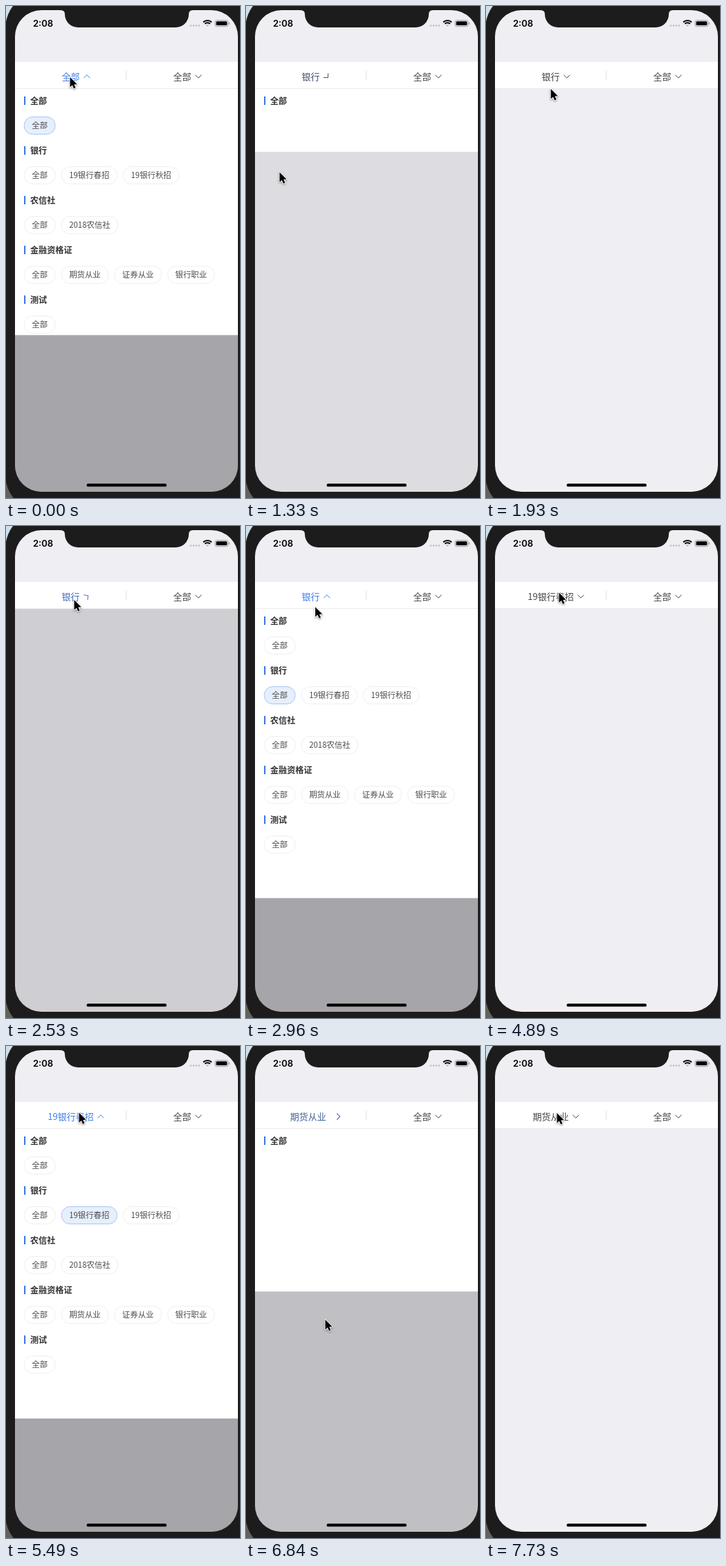
An HTML page with a canvas that plays this animation: 338 by 712 pixels, repeating every 8000 ms.

```html
<!DOCTYPE html>
<html lang="zh-CN">
<head>
<meta charset="utf-8">
<title>Filter dropdown</title>
<style>
html, body { margin: 0; width: 100%; height: 100%; overflow: hidden; background: #1c1c1c; }
canvas { display: block; width: 338px; height: 712px; }
</style>
</head>
<body>
<canvas id="stage"></canvas>
<script>
const W = 338, H = 712, LOOP = 8000;
const CJK = '"Noto Sans CJK SC", "Noto Sans CJK", "Noto Sans SC", sans-serif';
const BAR_END = 119.5, PANEL_H = 361;
const BLUE = [62, 125, 230], DARK = [68, 68, 68];

const canvas = document.getElementById('stage');
const ctx = canvas.getContext('2d');
const dpr = window.devicePixelRatio || 1;
canvas.width = W * dpr;
canvas.height = H * dpr;

const sections = [
  ['全部', '全部'],
  ['银行', '全部', '19银行春招', '19银行秋招'],
  ['农信社', '全部', '2018农信社'],
  ['金融资格证', '全部', '期货从业', '证券从业', '银行职业'],
  ['测试', '全部']
];

// Each visit to the menu: opening time, closing time, title before and after, selected [section, chip]
const visits = [
  { open: -800, close: 1169, from: '全部', to: '银行', pick: [0, 1] },
  { open: 2380, close: 3584, from: '银行', to: '19银行春招', pick: [1, 1] },
  { open: 5040, close: 6736, from: '19银行春招', to: '期货从业', pick: [1, 2] }
];

const bursts = [
  [0, 0, 1], [150, 1040, 7], [1330, 2080, 6], [2530, 3400, 7], [3690, 3840, 2], [4140, 4290, 2],
  [4740, 4890, 2], [5190, 6090, 7], [6240, 7140, 7], [7290, 7290, 1], [7580, 7730, 2]
];
const ticks = bursts.flatMap(([a, b, n]) =>
  Array.from({ length: n }, (_, i) => n > 1 ? a + Math.round((b - a) * i / (n - 1) / 10) * 10 : a));

const pointerPath = [
  [0, 92.5, 103], [890, 48.5, 240.5], [1400, 48.5, 240.5], [2080, 98.5, 107],
  [2680, 98.5, 107], [3400, 119.5, 241], [3990, 119.5, 241], [4290, 106.5, 89.5],
  [4590, 106.5, 89.5], [4890, 105.5, 96.5], [5490, 105.5, 96.5], [6540, 114.5, 396],
  [6840, 114.5, 396], [7140, 99, 188], [7290, 101.5, 94.5], [7440, 101.5, 94.5],
  [7730, 102.5, 97], [LOOP, 102.5, 97]
];

const clamp = v => Math.max(0, Math.min(1, v));
const mix = (a, b, k) => a + (b - a) * k;
const ease = k => k < 0.5 ? 2 * k * k : 1 - 2 * (1 - k) ** 2;
const mixColor = (a, b, k) => `rgb(${a.map((v, i) => Math.round(mix(v, b[i], k)))})`;

function spring(sec) {
  if (sec <= 0) return 0;
  const decay = 7.26, freq = 4 * Math.PI;
  return 1 - Math.exp(-decay * sec) * (Math.cos(freq * sec) + decay / freq * Math.sin(freq * sec));
}

function pointerAt(t) {
  const i = pointerPath.findIndex(p => p[0] > t);
  const [t0, x0, y0] = pointerPath[i - 1], [t1, x1, y1] = pointerPath[i];
  const k = ease((t - t0) / (t1 - t0));
  return [mix(x0, x1, k), mix(y0, y1, k)];
}

function rect(x, y, w, h, color) {
  ctx.fillStyle = color;
  ctx.fillRect(x, y, w, h);
}

function round(x, y, w, h, r, fill, stroke) {
  ctx.beginPath();
  ctx.roundRect(x, y, w, h, r);
  if (fill) { ctx.fillStyle = fill; ctx.fill(); }
  if (stroke) { ctx.strokeStyle = stroke; ctx.stroke(); }
}

function text(str, x, midY, size, color, weight = 400) {
  ctx.font = `${weight} ${size}px ${CJK}`;
  ctx.fillStyle = color;
  ctx.fillText(str, x, midY + size * 0.38);
}

function titleLayout(str, center) {
  ctx.font = `400 13px ${CJK}`;
  const w = ctx.measureText(str).width;
  const x = center - (w + 15) / 2;
  return { x, arrow: x + w + 10.3 };
}

function chevron(x, turn, color) {
  ctx.save();
  ctx.translate(x, 102);
  ctx.rotate(turn * Math.PI);
  ctx.beginPath();
  ctx.moveTo(-4.5, 2.2);
  ctx.lineTo(0, -2.2);
  ctx.lineTo(4.5, 2.2);
  ctx.strokeStyle = color;
  ctx.stroke();
  ctx.restore();
}

function drawStatusBar() {
  ctx.fillStyle = '#000';
  ctx.font = '600 13px Inter, sans-serif';
  ctx.fillText('2:08', 39, 29.8);
  for (let i = 0; i < 4; i++) round(265.4 + i * 4, 27, 2.8, 2.8, 1.4, '#c3c3c8');

  ctx.strokeStyle = '#000';
  ctx.lineWidth = 1.9;
  for (const r of [8.6, 5.4]) {
    ctx.beginPath();
    ctx.arc(291, 29.6, r, -Math.PI * 0.75, -Math.PI * 0.25);
    ctx.stroke();
  }
  ctx.beginPath();
  ctx.moveTo(291, 30);
  ctx.arc(291, 30, 3.1, -Math.PI * 0.75, -Math.PI * 0.25);
  ctx.fill();

  ctx.lineWidth = 1;
  round(302, 20.8, 18.8, 8.8, 2.6, null, '#98989c');
  round(303.5, 22.3, 15.8, 5.8, 1.4, '#000');
  round(321.8, 23.6, 1.2, 3.2, 0.6, '#98989c');
}

function drawMenu(height, visit, closing) {
  if (height <= 0) return;
  ctx.save();
  ctx.beginPath();
  ctx.rect(13, BAR_END, 322, height);
  ctx.clip();
  rect(13, BAR_END, 322, height, '#fff');
  // Only the first heading survives while the list folds up
  sections.slice(0, closing ? 1 : undefined).forEach(([name, ...chips], row) => {
    const y = 137 + row * 72;
    round(26, y - 6.2, 2.2, 12.4, 0.6, mixColor(BLUE, BLUE, 0));
    text(name, 35, y, 12.1, '#333', 600);
    if (closing) return;
    let x = 26;
    chips.forEach((label, i) => {
      ctx.font = `400 11.4px ${CJK}`;
      const w = ctx.measureText(label).width + 22.6;
      const on = visit.pick[0] === row && visit.pick[1] === i + (row ? 0 : 1);
      const picked = on || (visit === visits[2] && row === 1 && i === 1);
      round(x + 0.3, y + 23.5, w - 0.6, 25, 12, isPicked(visit, row, i) ? '#e6effc' : '#fff',
        isPicked(visit, row, i) ? '#a8c6f2' : '#efeff1');
      text(label, x + 11.3, y + 36, 11.4, '#4c4c4c');
      x += w + 8.5;
    });
  });
  ctx.restore();
}

function isPicked(visit, row, i) {
  return visit.pick[0] === row && visit.pick[1] === i + 1;
}

function drawTitles(visit, closing, turn) {
  const old = titleLayout(visit.from, 101);
  const now = titleLayout(closing ? visit.to : visit.from, 101);
  const k = closing ? turn : 1;
  const color = mixColor(BLUE, DARK, turn);
  text(closing ? visit.to : visit.from, mix(old.x, now.x, k), 102, 13, color);
  chevron(mix(old.arrow, now.arrow, k), turn, color);

  const right = titleLayout('全部', 262), dark = mixColor(DARK, DARK, 0);
  text('全部', right.x, 102, 13, dark);
  chevron(right.arrow, 1, dark);
}

function drawNotch() {
  ctx.beginPath();
  ctx.moveTo(79, 5);
  ctx.lineTo(79, 6);
  ctx.quadraticCurveTo(85, 6, 85, 12);
  ctx.arcTo(85, 31, 104, 31, 19);
  ctx.arcTo(264, 31, 264, 12, 19);
  ctx.lineTo(264, 12);
  ctx.quadraticCurveTo(264, 6, 270, 6);
  ctx.lineTo(270, 5);
  ctx.fillStyle = '#1c1c1c';
  ctx.fill();
}

function drawPointer(x, y) {
  ctx.save();
  ctx.translate(x, y);
  ctx.beginPath();
  [[0, 0], [0, 14.4], [3.3, 11.4], [5.5, 16.4], [8, 15.3], [5.8, 10.5], [10.2, 10.3]]
    .forEach(p => ctx.lineTo(...p));
  ctx.closePath();
  ctx.lineJoin = 'round';
  ctx.lineWidth = 2;
  ctx.strokeStyle = '#fff';
  ctx.shadowColor = 'rgba(0,0,0,.4)';
  ctx.shadowBlur = 2.5 * dpr;
  ctx.shadowOffsetY = dpr;
  ctx.stroke();
  ctx.shadowColor = 'transparent';
  ctx.fillStyle = '#000';
  ctx.fill();
  ctx.restore();
}

function draw(t) {
  const visit = visits.filter(v => v.open <= t).pop();
  const closing = t >= visit.close;
  const since = t - (closing ? visit.close : visit.open);
  const fold = 1 - ease(clamp(since / 250));
  const shade = closing ? fold : ease(clamp(since / 320));
  const height = PANEL_H * (closing ? fold : spring((since - 200) / 1000));
  const spin = clamp(since / 210);

  ctx.setTransform(dpr, 0, 0, dpr, 0, 0);
  ctx.lineWidth = 1;
  rect(0, 0, W, H / 2, '#cddeea');
  rect(0, H / 2, W, H / 2, '#62625a');
  round(-1, -22, 352, 755, 55, '#1c1c1c');

  ctx.save();
  ctx.beginPath();
  ctx.roundRect(13, 6, 322, 697, 38);
  ctx.clip();
  rect(13, 6, 322, 697, '#eeeef3');
  rect(13, BAR_END, 322, 600, `rgba(0,0,0,${0.3 * shade})`);
  rect(13, 81, 322, BAR_END - 81, '#fff');
  drawMenu(height, visit, closing);
  rect(13, 119, 322, 1, '#ececee');
  rect(173, 93, 1, 15, '#e6e6e8');
  drawTitles(visit, closing, closing ? spin : 1 - spin);
  drawStatusBar();
  drawNotch();
  round(116.5, 691.2, 115.5, 4.4, 2.2, '#000');
  ctx.restore();

  drawPointer(...pointerAt(t));
}

function frame() {
  const now = performance.now() % LOOP;
  draw(ticks.filter(t => t <= now).pop());
  requestAnimationFrame(frame);
}
frame();
</script>
</body>
</html>
```
